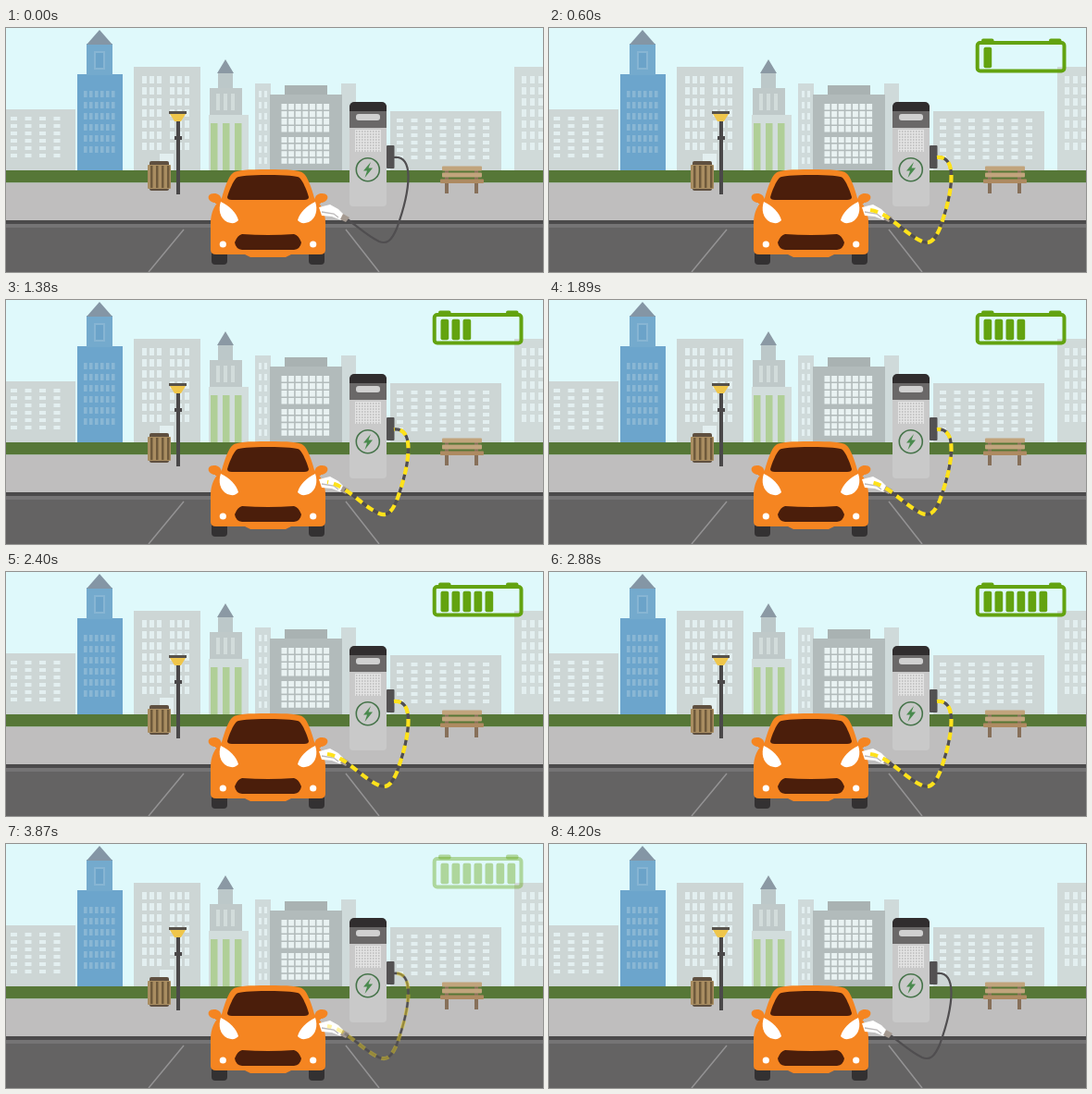
An HTML page with a canvas that plays this animation: 580 by 264 pixels, repeating every 4230 ms.

```html
<!DOCTYPE html>
<html lang="en">
<head>
<meta charset="utf-8">
<title>Electric car charging</title>
<style>
  html, body { margin: 0; width: 100%; height: 100%; overflow: hidden; background: #dff9fb; }
  canvas { display: block; width: 580px; height: 264px; }
</style>
</head>
<body>
<canvas id="stage" width="580" height="264"></canvas>
<script>
const LOOP = 4230, FRAME = 30;
const SKY = '#dff9fb', DARK = '#4a4849', GREEN = '#63a310';
const stage = document.getElementById('stage');
const scene = document.createElement('canvas');
scene.width = 580;
scene.height = 264;
let c = scene.getContext('2d');

function rect(color, x, y, w, h, r = 0) {
  c.fillStyle = color;
  c.beginPath();
  c.roundRect(x, y, w, h, r);
  c.fill();
}

function shape(color, d) {
  c.fillStyle = color;
  c.fill(new Path2D(d));
}

function line(color, width, d) {
  c.strokeStyle = color;
  c.lineWidth = width;
  c.stroke(new Path2D(d));
}

function disc(color, x, y, rx, ry = rx, turn = 0) {
  c.fillStyle = color;
  c.beginPath();
  c.ellipse(x, y, rx, ry, turn, 0, 7);
  c.fill();
}

function grid(color, x, y, cols, rows, dx, dy, w, h) {
  for (let i = 0; i < cols; i++)
    for (let j = 0; j < rows; j++) rect(color, x + i * dx, y + j * dy, w, h);
}

// Draws a part and its mirror image about the car's centre line
function mirrored(draw) {
  draw();
  c.save();
  c.translate(566, 0);
  c.scale(-1, 1);
  draw();
  c.restore();
}

function drawCity() {
  const pale = '#cdd6d5', glass = '#e3eff0';

  rect(pale, 0, 88, 75, 66);
  grid(glass, 5, 96, 4, 6, 15.5, 8, 7, 4);

  rect('#6ca5cc', 77, 50, 49, 104);
  rect('#74aacd', 87, 17, 28, 34);
  shape('#8496a5', 'M101 2L87 18H115Z');
  rect('#87b5d3', 95, 25, 12, 20);
  rect('#6ba3c9', 97, 27, 8, 16);
  grid('#8ab7d4', 84, 68, 6, 6, 6, 12, 3.5, 7);

  rect(pale, 138, 42, 72, 112);
  grid(glass, 147, 52, 3, 7, 8, 12, 5, 8);
  grid(glass, 177, 52, 3, 7, 8, 12, 5, 8);
  rect(glass, 166, 136, 15, 18);

  shape('#8b99a4', 'M237 34L228 49H246Z');
  rect('#bcc8c9', 229, 49, 16, 16);
  rect('#bfc9c9', 220, 65, 35, 30);
  grid('#d2dcdb', 227, 71, 3, 1, 8, 1, 4, 18);
  rect('#d2dddc', 219, 94, 43, 60);
  grid('#b0cf97', 221, 103, 3, 1, 13, 1, 7.5, 51);

  rect('#cfdada', 269, 60, 17, 94);
  grid(glass, 273, 68, 2, 7, 6, 12, 3, 7);
  rect('#cfdada', 362, 60, 16, 94);
  rect('#a9b2b2', 301, 62, 46, 11);
  rect('#b2bbbb', 285, 72, 78, 82);
  grid('#e9f2f2', 297.5, 82, 7, 4, 7.6, 8, 6, 6.5);
  grid('#e9f2f2', 297.5, 118, 7, 4, 7.6, 7.6, 6, 6);

  rect(pale, 415, 90, 120, 64);
  grid(glass, 422, 98, 7, 6, 15.5, 8, 7, 4);

  rect('#d0dad9', 549, 42, 31, 112);
  grid(glass, 557, 52, 3, 7, 9, 12, 5, 8);
}

function drawStreet() {
  rect('#567737', 0, 154, 580, 13.5);
  rect('#bfbebe', 0, 167.5, 580, 41);
  rect('#4b4a4b', 0, 208, 580, 4);
  rect('#757475', 0, 212, 580, 4);
  rect('#646363', 0, 216, 580, 48);
  line('#949394', 1.5, 'M192 218L154 264M367 218L403 264');

  // Street lamp
  rect(DARK, 184, 99, 4, 81);
  rect(DARK, 182, 117, 8, 4);
  rect('#57524b', 176, 90, 19, 3);
  shape('#efc64b', 'M177 93H194L189 101H182Z');

  // Litter bin
  rect('#5f5040', 155, 144, 21, 32, 2);
  rect('#a98d61', 153, 148, 25, 26, 1);
  grid('#6f5a3c', 156, 149, 4, 1, 6, 1, 2.5, 24);

  // Bench
  rect('#87705a', 474, 150, 4, 29);
  rect('#87705a', 506, 150, 4, 29);
  rect('#c1a47c', 471, 149.5, 43, 5, 1);
  rect('#c1a47c', 471, 156.5, 43, 5, 1);
  rect('#ae8a61', 469, 163.5, 47, 4.5, 1);
}

function drawCharger() {
  rect('#c9c9c9', 371, 82, 40, 111, 4);
  rect('#6a6868', 371, 84, 40, 24);
  rect('#302d2e', 371, 80, 40, 10, [5, 5, 0, 0]);
  rect('#d0d0d0', 378, 93, 26, 7, 3);
  rect('#e3e3e3', 377, 110, 28, 24);
  grid('#c4c4c4', 378, 111, 9, 8, 3, 3, 1.5, 2);
  line('#46744a', 1.6, 'M403.3 153.2a12.5 12.5 0 1 1-25 0a12.5 12.5 0 1 1 25 0');
  shape('#4a8a4e', 'M394 145L386 154.5H390L387.5 162L396 151.5H391.5Z');
  rect('#535152', 411, 127, 8.5, 25, 1);
}

function drawCar() {
  const orange = '#f58521', brown = '#4b1e0b';
  mirrored(() => {
    rect('#333132', 222, 232, 17, 24, 4);
    disc(orange, 225.5, 184, 7, 5, 0.2);
    rect(orange, 226, 185, 12, 5);
  });
  shape(orange, 'M283 153C262 153 249 153.5 245 157C240 161 236 173 233 184' +
    'C225 191 221 200 221 211V240Q221 245 227 245H258L264 248H302L308 245H339' +
    'Q345 245 345 240V211C345 200 341 191 333 184C330 173 326 161 321 157C317 153.5 304 153 283 153Z');
  shape(brown, 'M283 159C264 159 251 160 249 162C245 166 241 176 239 183' +
    'Q239 186 244 186H322Q327 186 327 183C325 176 321 166 317 162C315 160 302 159 283 159Z');
  mirrored(() => {
    shape('#fff', 'M232 188C241 192 249 200 251 208Q247 213 239 210C231 206 229 196 232 188Z');
    disc('#fff', 234.3, 234, 3.6);
  });
  shape(brown, 'M255 223Q283 225 311 223Q316 224 319 232Q318 239 311 240H255Q248 239 247 232Q250 224 255 223Z');
}

function drawPlug() {
  shape('#fff', 'M338 194L350 191L359 196L366 203L362 208L352 204L341 203Z');
  line('#bcb9ba', 1.3, 'M341 199L354 201L359 205');
  shape('#a59a91', 'M364 201L371 205L367 210L361 207Z');
}

const wire = 'M419 140C430 139 434.5 147 434.5 161C434.5 178 428.5 199 422 217' +
  'C416 231 411 234 403 231C390 225 379 214 366 205';
const cable = new Path2D(wire);
const feed = new Path2D(wire + 'C360 201 354 198 347 197');

function drawBackdrop() {
  rect(SKY, 0, 0, 580, 264);
  drawCity();
  drawStreet();
  drawCharger();
  line('#504e50', 2.2, wire);
  drawCar();
  drawPlug();
}

function drawCurrent(t) {
  c.strokeStyle = '#504e50';
  c.lineWidth = 3.2;
  c.stroke(cable);
  c.strokeStyle = '#ffe21b';
  c.lineWidth = 4.2;
  c.setLineDash([8.4, 6]);
  c.lineDashOffset = 0.5 - 14.4 * t / 120;
  c.stroke(feed);
  c.setLineDash([]);
}

function drawBattery(t) {
  rect(GREEN, 467, 11.5, 13.5, 5, 2);
  rect(GREEN, 540, 11.5, 13.5, 5, 2);
  c.strokeStyle = GREEN;
  c.lineWidth = 4;
  c.beginPath();
  c.roundRect(462.7, 16, 93.8, 30.5, 3);
  c.stroke();
  const bars = Math.min(7, Math.floor((t - 330) / 480) + 1);
  for (let i = 0; i < bars; i++) rect(GREEN, 469.5 + 12 * i, 20.7, 8.7, 22.5, 2);
}

const clamp = v => Math.max(0, Math.min(1, v));

function draw(t) {
  c.globalAlpha = 1;
  c.drawImage(scene, 0, 0);
  c.globalAlpha = Math.min(clamp((t - 60) / 240), clamp((3990 - t) / 300));
  if (c.globalAlpha) {
    drawCurrent(t);
    drawBattery(t);
  }
}

drawBackdrop();
c = stage.getContext('2d');

const start = performance.now();
function tick() {
  const t = (performance.now() - start) % LOOP;
  draw(Math.floor(t / FRAME) * FRAME);
  requestAnimationFrame(tick);
}
tick();
</script>
</body>
</html>
```
